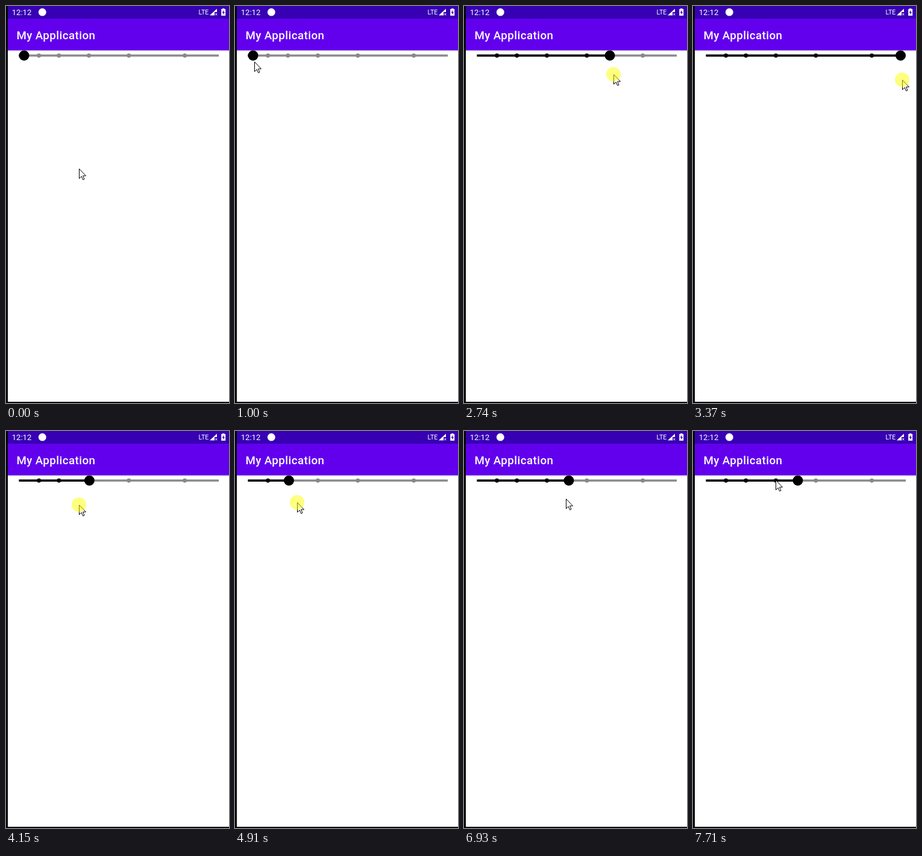
Animation, 370 px wide and 657 px high, one loop 8 s. Source, as an HTML page:

```html
<!DOCTYPE html>
<html lang="en">
<head>
<meta charset="utf-8">
<title>Slider demo</title>
<style>
  html, body { margin: 0; width: 100%; height: 100%; overflow: hidden; background: #000; }
  svg { display: block; width: 370px; height: 657px; }
  text { font-family: Roboto, sans-serif; fill: #fff; }
  .title { font-size: 18.75px; font-weight: 500; letter-spacing: .42px; }
  .clock { font-size: 13.1px; }
  .net { font-size: 10.6px; }
</style>
</head>
<body>
<svg viewBox="0 0 370 657">
  <defs>
    <linearGradient id="shade" x2="0" y2="1">
      <stop stop-color="#000" stop-opacity=".14"/>
      <stop offset="1" stop-color="#000" stop-opacity="0"/>
    </linearGradient>
  </defs>
  <rect x="3" width="367" height="655" fill="#fff"/>
  <rect x="3" y="73" width="367" height="3" fill="url(#shade)"/>
  <rect x="3" y="21" width="367" height="52.4" fill="#6200ee"/>
  <rect x="3" width="367" height="21" fill="#3700b3"/>

  <text class="clock" x="9.7" y="15.2">12:12</text>
  <circle cx="60.3" cy="10.2" r="6.4" fill="#fff"/>
  <text class="net" x="319.6" y="14">LTE</text>
  <path d="M338 15.5 350 4.5V10H346V15.5Z" fill="#fff"/>
  <path d="M347.2 12l3 3.4m0-3.4l-3 3.4" stroke="#fff"/>
  <path d="M359 5V4h3.4v1H364.2V16H357.2V5Z" fill="#fff"/>
  <path d="M361.3 6.8 358.6 11.2H360.4V14.4L363 10H361.3Z" fill="#3700b3"/>
  <text class="title" x="17.4" y="55">My Application</text>

  <g transform="translate(0 82)">
    <rect x="21.5" y="-1.7" width="331.5" height="3.4" fill="#888"/>
    <rect id="fill" x="21.5" y="-1.7" height="3.4"/>
    <g id="ticks"></g>
    <circle id="thumb" r="8.5"/>
  </g>
  <g id="pointer">
    <path d="M.5 .5V16.5L4.2 13 6.7 18.6 9 17.6 6.6 12H11.5Z" fill="#fff" stroke="#000"/>
    <circle id="press" r="12" fill="#ff0" fill-opacity=".5"/>
  </g>
</svg>
<script>
  const LOOP = 8000, FRAME = 78;
  const PRESS = 1790, RELEASE = 6930;
  const TRACK = { left: 21.5, width: 331.5, thumbMin: 30, thumbMax: 344.5 };
  const LAG_GROWTH = 0.015;

  const linear = p => p;
  const easeIn = p => p ** 1.5;
  const easeOut = p => 1 - (1 - p) ** 2;
  const easeInOut = p => p * p * (3 - 2 * p);
  const clamp = (v, min, max) => Math.min(max, Math.max(min, v));

  // Pointer strokes, each starting where the one before ended
  let from = { x: 121, y: 269 };
  const home = from;
  const moves = [];
  function move(first, last, x, y, ease) {
    const step = (last - first) / Math.round((last - first) / FRAME);
    const to = { x, y };
    moves.push({ first, last, step, from, to, ease });
    from = to;
  }
  move(230, 1000, 32, 92, easeOut);
  move(1090, 1240, 29, 80, easeOut);
  move(2020, 2110, 72, 80, linear);
  move(2190, 2820, 270, 117, linear);
  move(2900, 3370, 347, 122, easeOut);
  move(3680, 4440, 24, 122, easeInOut);
  move(4520, 4910, 103, 118, easeIn);
  move(4990, 5290, 198, 121, linear);
  move(5370, 5590, 217, 121, easeOut);
  move(5820, 6530, 176, 119, easeOut);
  move(6930, 7710, 137, 81, easeOut);

  function lastCapture(t) {
    const m = moves.findLast(m => m.first <= t);
    if (!m) return 0;
    const steps = Math.floor((t - m.first) / m.step + 0.15);
    return Math.min(m.last, m.first + steps * m.step);
  }

  function pointerAt(t) {
    const m = moves.findLast(m => m.first - m.step <= t);
    if (!m) return home;
    const start = m.first - m.step;
    const k = m.ease(clamp((t - start) / (m.last - start), 0, 1));
    const mix = axis => m.from[axis] + (m.to[axis] - m.from[axis]) * k;
    return { x: mix("x"), y: mix("y") };
  }

  // The thumb trails the pointer a little more the longer the drag lasts
  function thumbAt(t) {
    const held = clamp(t, PRESS, RELEASE);
    const lag = (held - PRESS) * LAG_GROWTH;
    return clamp(pointerAt(held - lag).x - 2, TRACK.thumbMin, TRACK.thumbMax);
  }

  const el = id => document.getElementById(id);
  const ticks = [.1, .2, .35, .55, .83].map(share => {
    const x = TRACK.left + TRACK.width * share;
    const dot = document.createElementNS("http://www.w3.org/2000/svg", "circle");
    dot.setAttribute("cx", x);
    dot.setAttribute("r", 3.4);
    el("ticks").append(dot);
    return { x, dot };
  });

  function draw(time) {
    const t = lastCapture(time);
    const { x, y } = pointerAt(t);
    const thumb = thumbAt(t);
    const pressed = time >= PRESS && time < RELEASE;
    el("pointer").setAttribute("transform", `translate(${Math.round(x)} ${Math.round(y)})`);
    el("press").setAttribute("visibility", pressed ? "visible" : "hidden");
    el("thumb").setAttribute("cx", thumb);
    el("fill").setAttribute("width", thumb - TRACK.left);
    for (const tick of ticks) tick.dot.setAttribute("fill", tick.x <= thumb ? "#000" : "#888");
  }

  const start = performance.now();
  function frame() {
    draw((performance.now() - start) % LOOP);
    requestAnimationFrame(frame);
  }
  frame();
</script>
</body>
</html>
```
